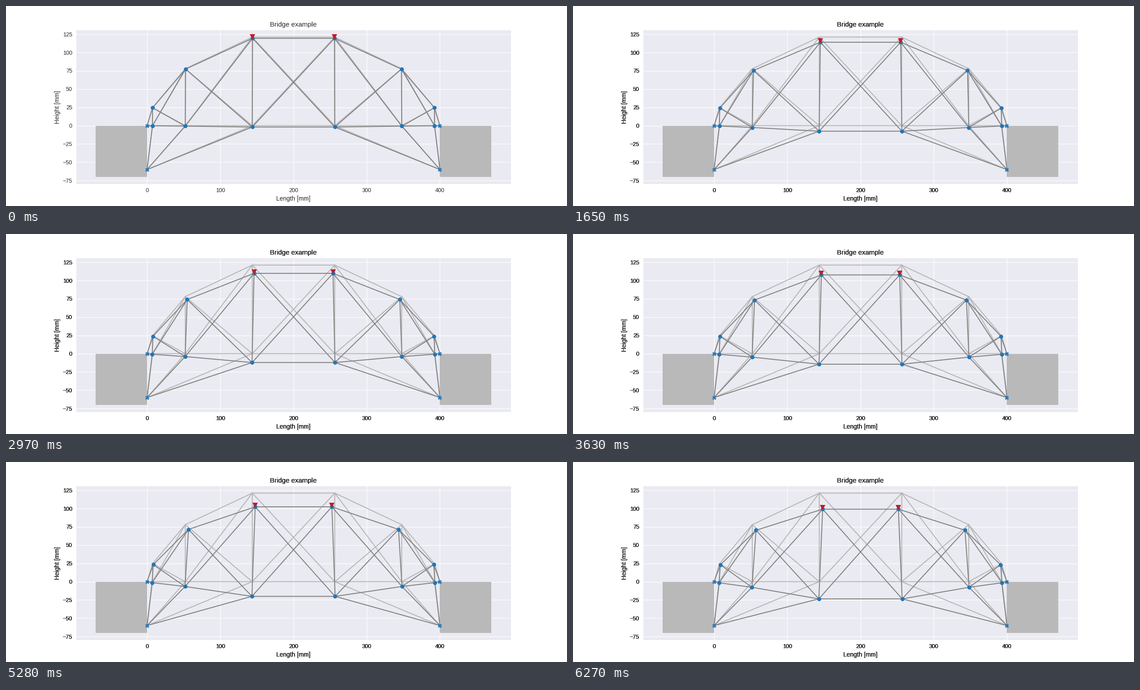
Animation, 1252 px wide and 447 px high, one loop 6.6 s. Source, as a matplotlib script:

```python
import matplotlib.pyplot as plt
import numpy as np
from matplotlib.animation import FuncAnimation
from matplotlib.patches import Rectangle

W, H, DPI = 1252, 447, 64
FRAMES, INTERVAL = 20, 330
SPAN = 400
SCALE = 1.634  # pixels per mm
TEXT = "#262626"

# Left half: name -> (x, y, dx, dy); displacements at full load, in mm
NODES = {
    "S0": (0, 0, 0, 0),
    "S1": (0, -60, 0, 0),
    "A": (7.4, 24.6, 1.2, -1.5),
    "B": (52.2, 78, 5.1, -7.6),
    "C": (143.7, 121.2, 4.6, -22.0),
    "D": (143.7, 0, -0.6, -23.5),
    "E": (52.2, 0, -0.4, -7.7),
    "F": (7.4, 0, -0.6, -1.5),
}
BARS = ("S0-A S0-F A-F A-B A-E F-B F-E B-E B-C B-D E-C E-D C-D "
        "S1-F S1-E S1-D").split()
JOINTS = "ABCDEF"


def px(v):
    """Pixels to points."""
    return v * 72 / DPI


def place(name, load):
    """Node position; a trailing apostrophe means the mirrored node."""
    x, y, dx, dy = NODES[name[0:2].rstrip("'")]
    x, y = x + load * dx, y + load * dy
    return (SPAN - x, y) if name.endswith("'") else (x, y)


def mirrored(names):
    return list(names) + [n + "'" for n in names]


def all_bars():
    pairs = [bar.split("-") for bar in BARS]
    pairs += [[a + "'", b + "'"] for a, b in pairs]
    return pairs + [["C", "C'"], ["D", "D'"], ["C", "D'"], ["D", "C'"]]


def truss_path(load):
    """All bars as one broken line."""
    points = []
    for a, b in all_bars():
        points += [place(a, load), place(b, load), (np.nan, np.nan)]
    return np.array(points).T


def positions(names, load):
    return np.array([place(n, load) for n in names]).T


def set_up(ax):
    ax.set_xlim(200 - 485.15 / SCALE, 200 + 485.15 / SCALE)
    ax.set_ylim(-130.33 / SCALE, 213.86 / SCALE)
    ax.set_xticks(range(0, 401, 100))
    ax.set_yticks(range(-75, 126, 25))
    ax.tick_params(length=0, pad=px(8.75), labelsize=px(12.5),
                   labelcolor=TEXT)
    ax.set_title("Bridge example", size=px(15), pad=px(7.5), color=TEXT)
    ax.set_xlabel("Length [mm]", size=px(13.75), labelpad=px(5), color=TEXT)
    ax.set_ylabel("Height [mm]", size=px(13.75), labelpad=px(5), color=TEXT)


plt.rcParams["font.family"] = "Liberation Sans"
fig = plt.figure(figsize=(W / DPI, H / DPI), dpi=DPI, facecolor="white")
box = [0.125, 0.11, 0.775, 0.77]
ax = fig.add_axes(box, facecolor="#eaeaf2")
set_up(ax)
ax.set_axisbelow(True)
ax.grid(color="white", linewidth=px(1.25))
for spine in ax.spines.values():
    spine.set_visible(False)

# Repeated lettering makes the text heavier after the first frames
ghosts = [fig.add_axes(box, frameon=False) for _ in range(3)]
for ghost in ghosts:
    set_up(ghost)

for x in (-70, SPAN):
    ax.add_patch(Rectangle((x, -70), 70, 70, color="#b9b9b9", lw=0, zorder=1.5))

bar_width = px(2.1)
ax.plot(*truss_path(0), color="#b7b7b7", lw=bar_width, zorder=2)
truss, = ax.plot([], [], color="#848484", lw=bar_width, zorder=3)
blue = dict(ls="", color="#1f77bc", mew=0, zorder=4)
ax.plot(*positions(mirrored(["S0", "S1"]), 0), marker="X", ms=px(9), **blue)
joints, = ax.plot([], [], marker="o", ms=px(9), **blue)
loads, = ax.plot([], [], ls="", marker="v", ms=px(12.8), mew=0,
                 color="#be1e24", zorder=5)


def update(i):
    load = (i + 1.6) / (FRAMES + 0.6)
    truss.set_data(*truss_path(load))
    joints.set_data(*positions(mirrored(JOINTS), load))
    x, y = positions(["C", "C'"], load)
    loads.set_data(x, y + 2)
    for k, ghost in enumerate(ghosts):
        ghost.set_visible(i > k)
    return truss, joints, loads


anim = FuncAnimation(fig, update, frames=FRAMES, interval=INTERVAL,
                     repeat=True, repeat_delay=0, blit=False)
plt.show()
```
